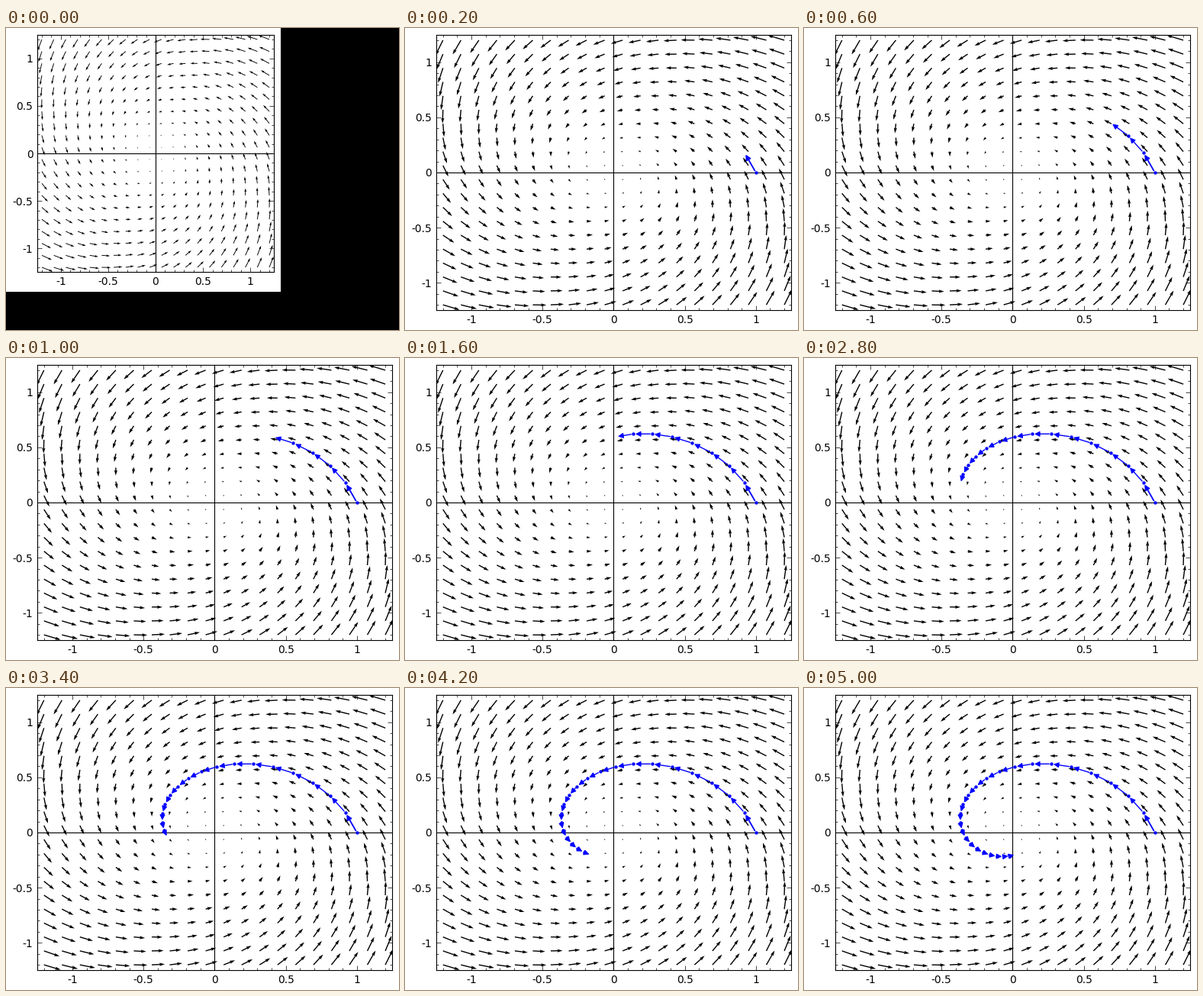
A matplotlib script that plays this animation: 515 by 395 pixels, repeating every 5200 ms.

```python
import numpy as np
import matplotlib.pyplot as plt
from matplotlib.animation import FuncAnimation
from matplotlib.patches import FancyArrowPatch, Rectangle
from matplotlib.ticker import AutoMinorLocator

W, H, DPI = 515, 395, 100
STEPS = 25
DT = 0.2
LIM = 1.248
BLUE = "#0000ff"

plt.rcParams["font.family"] = "DejaVu Sans"


def field(x, y):
    """Damped rotation about the centre."""
    return -0.4 * x - 0.9 * y, 0.9 * x - 0.4 * y


def euler(x, y, n):
    path = [(x, y)]
    for _ in range(n):
        u, v = field(x, y)
        x, y = x + DT * u, y + DT * v
        path.append((x, y))
    return np.array(path)


def field_plot(left, top, right, bottom):
    """Axes with the vector field; edges in pixels from the top left."""
    ax = fig.add_axes([left / W, 1 - bottom / H,
                       (right - left) / W, (bottom - top) / H])
    ax.set(xlim=(-LIM, LIM), ylim=(-LIM, LIM))
    ticks = [-1, -0.5, 0, 0.5, 1]
    labels = [f"{t:g}" for t in ticks]
    ax.set_xticks(ticks, labels)
    ax.set_yticks(ticks, labels)
    for axis in (ax.xaxis, ax.yaxis):
        axis.set_minor_locator(AutoMinorLocator(5))
    ax.tick_params(which="both", direction="in", top=True, right=True,
                   width=0.5, pad=4, labelsize=10)
    ax.tick_params(which="major", length=4)
    ax.tick_params(which="minor", length=2, pad=4)
    for spine in ax.spines.values():
        spine.set_linewidth(0.8)
    ax.axhline(0, color="black", lw=0.8)
    ax.axvline(0, color="black", lw=0.8)
    x, y = np.meshgrid(*[np.linspace(-1.2, 1.2, 20)] * 2)
    ax.quiver(x, y, *field(x, y), angles="xy", color="black")
    ax.set(xlim=(-LIM, LIM), ylim=(-LIM, LIM))
    return ax


fig = plt.figure(figsize=(W / DPI, H / DPI), dpi=DPI, facecolor="black")
page = Rectangle((0, 0), 1, 1, transform=fig.transFigure,
                 fc="white", ec="none", zorder=-1)
fig.add_artist(page)

small = field_plot(41, 9, 351, 319)
large = field_plot(40.8, 9, 506, 369)

path = euler(1.0, 0.0, STEPS)
arrows = []
for i in range(STEPS):
    arrow = FancyArrowPatch(
        path[i], path[i + 1], lw=1.3 if i == 0 else 1.0,
        arrowstyle="-|>,head_width=2,head_length=4", mutation_scale=1,
        shrinkA=2, shrinkB=2, fc=BLUE, ec=BLUE, zorder=3)
    large.add_patch(arrow)
    arrows.append(arrow)
dots = large.scatter([], [], s=10, c=BLUE, linewidths=0, zorder=4)


def update(n):
    first = n == 0
    small.set_visible(first)
    large.set_visible(not first)
    w, h = (360, 345) if first else (W, H)
    page.set_bounds(0, 1 - h / H, w / W, h / H)
    for i, arrow in enumerate(arrows):
        arrow.set_visible(i < n)
    dots.set_offsets(path[:n])
    return []


anim = FuncAnimation(fig, update, frames=STEPS + 1, interval=200,
                     init_func=lambda: update(0), repeat=True,
                     repeat_delay=0, blit=False)
plt.show()
```
